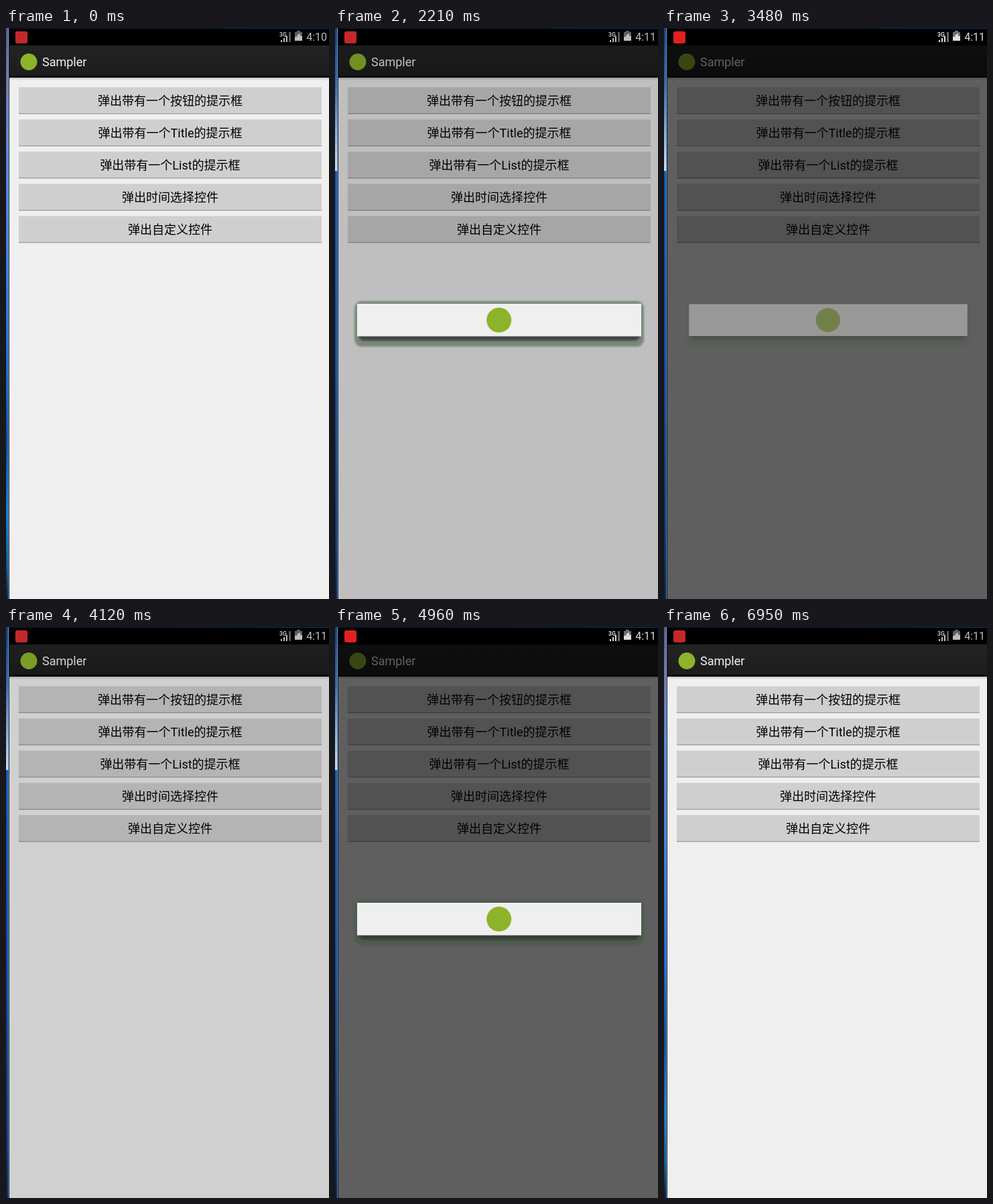
Animation of 482x851 px, one loop 7050 ms. Source, as an HTML page:

```html
<!DOCTYPE html>
<html lang="zh-CN">
<head>
<meta charset="utf-8">
<title>Dialog demo</title>
<style>
html, body { margin: 0; width: 100%; height: 100%; overflow: hidden; background: #efefef; }
svg { display: block; width: 482px; height: 851px; }
text { font-family: Roboto, "Noto Sans CJK SC", "Noto Sans CJK", sans-serif; font-size: 18px; }
</style>
</head>
<body>
<svg viewBox="0 0 482 851">
  <defs>
    <linearGradient id="wallA" x2="0" y2="1">
      <stop offset="0" stop-color="#55588c"/>
      <stop offset=".08" stop-color="#6f74a8"/>
      <stop offset=".2" stop-color="#5a85d8"/>
      <stop offset=".4" stop-color="#3a7ce0"/>
      <stop offset=".6" stop-color="#1c66c8"/>
      <stop offset=".72" stop-color="#0d4f9c"/>
      <stop offset=".85" stop-color="#1479c4"/>
      <stop offset=".94" stop-color="#0b5a94"/>
      <stop offset="1" stop-color="#041c38"/>
    </linearGradient>
    <linearGradient id="wallB" x2="0" y2="1">
      <stop offset="0" stop-color="#123f80"/>
      <stop offset=".1" stop-color="#2e66ad"/>
      <stop offset=".18" stop-color="#7ea5d6"/>
      <stop offset=".25" stop-color="#c3d6ee"/>
      <stop offset=".25" stop-color="#1257b0"/>
      <stop offset=".6" stop-color="#0e4a9e"/>
      <stop offset=".9" stop-color="#083373"/>
      <stop offset="1" stop-color="#05204c"/>
    </linearGradient>
    <linearGradient id="topEdge">
      <stop offset="0" stop-color="#0a1830"/>
      <stop offset=".5" stop-color="#08224a"/>
      <stop offset="1" stop-color="#0d3a7c"/>
    </linearGradient>
    <linearGradient id="bar" x2="0" y2="1">
      <stop offset="0" stop-color="#232323"/>
      <stop offset="1" stop-color="#1d1d1d"/>
    </linearGradient>
    <linearGradient id="barShade" x2="0" y2="1">
      <stop offset="0" stop-color="#c9c6c9"/>
      <stop offset="1" stop-color="#efefef"/>
    </linearGradient>
    <filter id="soft" x="-10%" y="-40%" width="120%" height="180%">
      <feGaussianBlur stdDeviation="1.6"/>
    </filter>
  </defs>

  <rect x="5" width="477" height="851" fill="#efefef"/>
  <rect x="5" y="26" width="477" height="46" fill="url(#bar)"/>
  <rect x="5" y="71" width="477" height="3" fill="#080608"/>
  <rect x="5" y="74" width="477" height="4" fill="url(#barShade)"/>
  <circle cx="34" cy="50.5" r="12.5" fill="#8db32a"/>
  <text x="54" y="57" fill="#f3f3f3">Sampler</text>
  <g id="buttons"></g>

  <rect id="dim" x="5" y="26" width="477" height="825"/>

  <g id="dialog">
    <rect x="29" y="407" width="432" height="68" rx="11" fill="#3f5c3f" opacity=".55" filter="url(#soft)"/>
    <rect x="35" y="414" width="420" height="52" rx="8" fill="#333" opacity=".75" filter="url(#soft)"/>
    <rect x="33" y="411" width="424" height="48.5" fill="#efefef"/>
    <circle cx="244.7" cy="435.3" r="18.5" fill="#8db32a"/>
  </g>

  <rect x="5" width="477" height="26"/>
  <rect x="5" width="477" height="1" fill="url(#topEdge)"/>
  <rect id="app" x="14" y="5" width="18" height="18" rx="3"/>
  <g id="status">
    <text x="408" y="12.5" style="font-size:8.5px;font-weight:700">3G</text>
    <path d="M410 21v-3h2v3zM414 21v-6h2v6zM418 21v-9h2v9z"/>
    <path d="M422 21V6h3v15z" opacity=".45"/>
    <path d="M434 6V4h5v2h3v13h-11V6z" opacity=".5"/>
    <path d="M431 19v-6h4l-1-2 5-3v4h3v7z"/>
    <text id="clock" x="479" y="19" text-anchor="end" style="font-size:16px"></text>
  </g>

  <rect id="wall" width="4" height="851"/>
  <rect x="3" width="1" height="851" fill="#a9c8e8" opacity=".6"/>
  <rect x="4" width="1" height="851" fill="#0a1422"/>
</svg>
<script>
const LOOP = 7050;
const $ = id => document.getElementById(id);

const labels = [
  "弹出带有一个按钮的提示框",
  "弹出带有一个Title的提示框",
  "弹出带有一个List的提示框",
  "弹出时间选择控件",
  "弹出自定义控件"
];

$("buttons").innerHTML = labels.map((label, i) => {
  const y = 88 + i * 48;
  return `<rect x="19" y="${y}" width="452" height="40" rx="1" fill="#cfcfcf"/>
    <rect x="19" y="${y}" width="452" height="1" fill="#d9d9d9"/>
    <rect x="19" y="${y + 39}" width="452" height="1.3" fill="#9c9c9c"/>
    <text x="245" y="${y + 27}" text-anchor="middle">${label}</text>`;
}).join("");

// [start ms, backdrop opacity, dialog opacity, dialog scale]
const steps = [
  [0, 0, 0, 1],
  [1870, 0, .35, .9],
  [1910, 0, .7, .96],
  [1960, 0, 1, .99],
  [2210, .2, 1, 1],
  [2310, .4, 1, 1],
  [2410, .6, 1, 1],
  [3480, .6, .4, .98],
  [3720, .32, 0, 1],
  [3920, .3, 0, 1],
  [4120, .13, 0, 1],
  [4220, 0, 0, 1],
  [4470, .04, .35, .9],
  [4500, .08, .7, .96],
  [4540, .13, 1, .99],
  [4760, .36, 1, 1],
  [4960, .6, 1, 1],
  [5060, .6, .4, .98],
  [5160, .46, 0, 1],
  [5260, .3, 0, 1],
  [5340, .13, 0, 1],
  [5430, 0, 0, 1]
];

function draw(t) {
  const [, dim, alpha, scale] = steps.findLast(s => s[0] <= t);
  $("dim").setAttribute("opacity", dim);
  $("dialog").setAttribute("opacity", alpha);
  $("dialog").setAttribute("transform",
    `translate(245 435) scale(${scale}) translate(-245 -435)`);
  $("clock").textContent = t < 2210 ? "4:10" : "4:11";
  const lit = dim > .3;
  $("status").setAttribute("fill", lit ? "#dedede" : "#bebebe");
  $("app").setAttribute("fill", lit ? "#e0211f" : "#c4282b");
  const wall = t >= 1800 && t < 6950 ? "wallB" : "wallA";
  $("wall").setAttribute("fill", `url(#${wall})`);
}

const start = performance.now();
function tick() {
  draw((performance.now() - start) % LOOP);
  requestAnimationFrame(tick);
}
tick();
</script>
</body>
</html>
```
